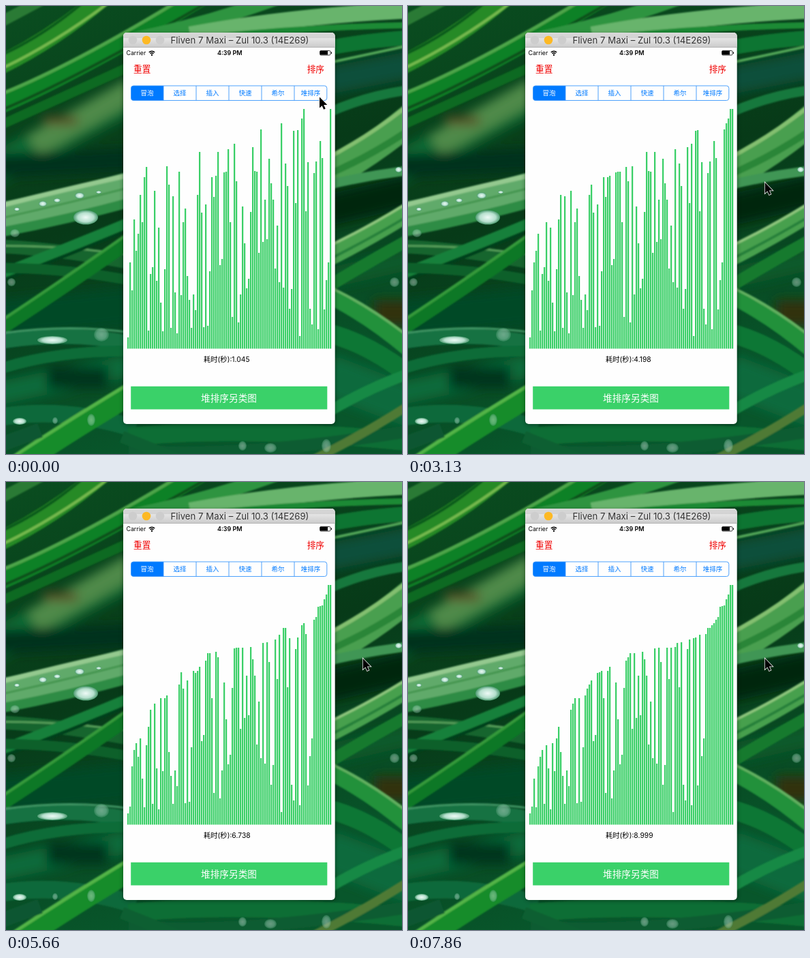
Recreate the animation shown at these times as an HTML page. Size 581 px wide and 657 px high, loop 8 s.

```html
<!DOCTYPE html>
<html lang="zh">
<head>
<meta charset="utf-8">
<title>冒泡</title>
<style>
  html, body { margin: 0; width: 100%; height: 100%; overflow: hidden; background: #07451e; }
  svg { display: block; width: 581px; height: 657px; }
  text { font-family: "Noto Sans CJK SC", "Noto Sans CJK", "Noto Sans", sans-serif; font-weight: 350; }
  .latin { font-family: Inter, "Open Sans", sans-serif; font-weight: 400; }
  .mixed { font-family: Inter, "Noto Sans CJK SC", "Noto Sans CJK", sans-serif; font-weight: 400; }
  .blades path { fill: none; }
  .mid { text-anchor: middle; }
  .tabs text { font-size: 9.5px; fill: #007aff; text-anchor: middle; }
</style>
</head>
<body>
<svg viewBox="0 0 581 657">
  <defs>
    <linearGradient id="base" x2=".3" y2="1">
      <stop offset="0" stop-color="#0a4d20"/>
      <stop offset=".5" stop-color="#073a18"/>
      <stop offset="1" stop-color="#08562b"/>
    </linearGradient>
    <linearGradient id="bar" x2="0" y2="1">
      <stop offset="0" stop-color="#d9d9d9"/>
      <stop offset=".36" stop-color="#d2d2d2"/>
      <stop offset=".4" stop-color="#e4e4e4"/>
      <stop offset="1" stop-color="#cbcbcb"/>
    </linearGradient>
    <radialGradient id="drop">
      <stop offset="0" stop-color="#eefaf6"/>
      <stop offset=".65" stop-color="#b5dfcd"/>
      <stop offset="1" stop-color="#4d9a70"/>
    </radialGradient>
    <filter id="soft"><feGaussianBlur stdDeviation="1"/></filter>
    <filter id="haze"><feGaussianBlur stdDeviation="8"/></filter>
    <filter id="shade" x="-10%" y="-10%" width="120%" height="120%"><feGaussianBlur stdDeviation="3"/></filter>
  </defs>

  <rect width="581" height="657" fill="url(#base)"/>
  <g class="blades" filter="url(#haze)">
    <path d="M-20 240L190 130" stroke="#0b6a35" stroke-width="46"/>
    <path d="M40 205L190 120" stroke="#4f8a48" stroke-width="34"/>
    <path d="M55 168H105" stroke="#5a4a20" stroke-width="12"/>
    <path d="M-20 235L190 225" stroke="#05301a" stroke-width="34"/>
    <path d="M-20 460L190 440" stroke="#064a28" stroke-width="56"/>
    <path d="M-20 570L190 525" stroke="#0a6a3a" stroke-width="34"/>
    <path d="M60 545H150" stroke="#04351c" stroke-width="32"/>
    <path d="M470 110L600 85" stroke="#08503a" stroke-width="40"/>
    <path d="M470 300L600 270" stroke="#06260f" stroke-width="46"/>
    <path d="M540 450H600" stroke="#33300f" stroke-width="38"/>
    <path d="M470 540L600 590" stroke="#0b6a3c" stroke-width="60"/>
    <path d="M470 400L600 370" stroke="#0b5a2a" stroke-width="30"/>
  </g>
  <g class="blades" filter="url(#soft)">
    <path d="M-20 92Q70 50 150 -20" stroke="#268a26" stroke-width="28"/>
    <path d="M-20 98Q70 58 168 -18" stroke="#75b94e" stroke-width="4"/>
    <path d="M-20 78Q60 44 130 -20" stroke="#0d5a1c" stroke-width="4"/>
    <path d="M-20 30L70 -18" stroke="#2c7a35" stroke-width="16"/>
    <path d="M-20 150Q90 105 300 -20" stroke="#118126" stroke-width="26"/>
    <path d="M-20 134Q90 92 260 -12" stroke="#4da548" stroke-width="5"/>
    <path d="M-20 158Q90 114 300 -8" stroke="#07501c" stroke-width="4"/>
    <path d="M-20 180Q90 130 190 85" stroke="#0c6a24" stroke-width="14"/>
    <path d="M180 50Q290 28 400 -12" stroke="#2f9440" stroke-width="20"/>
    <path d="M270 42Q420 14 600 6" stroke="#68b46c" stroke-width="24"/>
    <path d="M300 46Q450 30 600 28" stroke="#1c8a36" stroke-width="9"/>
    <path d="M470 62Q530 50 600 46" stroke="#0d7430" stroke-width="22"/>
    <path d="M470 84L600 56" stroke="#51a457" stroke-width="4"/>

    <path d="M-20 312Q80 292 190 262" stroke="#60aa6a" stroke-width="42"/>
    <path d="M-20 296Q80 270 190 246" stroke="#94c98f" stroke-width="7"/>
    <path d="M-20 314Q80 292 190 264" stroke="#45954f" stroke-width="3"/>
    <path d="M-20 334Q80 316 190 286" stroke="#2d8c45" stroke-width="14"/>
    <path d="M-20 352Q80 356 190 378" stroke="#13652f" stroke-width="20"/>
    <path d="M-20 352Q80 350 190 366" stroke="#559c59" stroke-width="3"/>
    <path d="M-20 398Q80 360 190 314" stroke="#17803a" stroke-width="16"/>
    <path d="M-20 408Q80 370 190 324" stroke="#05401a" stroke-width="5"/>
    <path d="M-20 384Q90 384 190 404" stroke="#0b602a" stroke-width="15"/>
    <path d="M-20 480Q80 415 190 338" stroke="#0f7827" stroke-width="22"/>
    <path d="M-20 470Q80 404 190 326" stroke="#369a3b" stroke-width="4"/>
    <path d="M-20 494Q90 474 190 496" stroke="#127243" stroke-width="22"/>
    <path d="M-20 482Q90 464 190 480" stroke="#3f9463" stroke-width="3"/>
    <path d="M-20 536Q70 504 190 506" stroke="#0b6c38" stroke-width="16"/>
    <path d="M-20 605Q80 585 190 620" stroke="#10693a" stroke-width="26"/>
    <path d="M10 680Q90 625 200 560" stroke="#168c2a" stroke-width="30"/>
    <path d="M0 668Q90 608 200 542" stroke="#53b446" stroke-width="5"/>
    <path d="M-20 648L50 622" stroke="#0b5630" stroke-width="22"/>

    <path d="M470 158Q530 130 600 122" stroke="#18783d" stroke-width="14"/>
    <path d="M465 252Q530 218 600 160" stroke="#4a9f4f" stroke-width="44"/>
    <path d="M465 226Q530 194 600 138" stroke="#83bf6f" stroke-width="6"/>
    <path d="M465 250Q530 224 600 176" stroke="#2a8639" stroke-width="10"/>
    <path d="M465 264Q530 248 600 240" stroke="#3f9655" stroke-width="14"/>
    <path d="M465 372Q530 340 600 296" stroke="#47a04e" stroke-width="28"/>
    <path d="M465 356Q530 326 600 282" stroke="#8cc47b" stroke-width="4"/>
    <path d="M465 376Q530 344 600 302" stroke="#25803a" stroke-width="4"/>
    <path d="M465 416Q530 376 600 338" stroke="#137a2e" stroke-width="18"/>
    <path d="M465 420Q530 450 600 510" stroke="#20913a" stroke-width="25"/>
    <path d="M465 408Q530 436 600 492" stroke="#62b060" stroke-width="4"/>
    <path d="M465 478Q530 492 600 548" stroke="#0c7735" stroke-width="28"/>
    <path d="M465 600Q530 560 600 536" stroke="#168944" stroke-width="16"/>
    <path d="M180 632Q350 614 600 640" stroke="#0e6e34" stroke-width="27"/>
    <path d="M180 652Q350 664 600 622" stroke="#0b5b32" stroke-width="18"/>
    <path d="M430 675Q510 638 600 580" stroke="#4f7a35" stroke-width="13"/>
    <path d="M170 632L260 668" stroke="#0a5e30" stroke-width="18"/>
  </g>
  <g fill="url(#drop)">
    <ellipse cx="117" cy="310" rx="18" ry="10.500"/>
    <ellipse cx="108" cy="278" rx="7" ry="4.500"/>
    <ellipse cx="54" cy="290" rx="6" ry="4"/>
    <ellipse cx="75" cy="285" rx="5" ry="3"/>
    <ellipse cx="16" cy="298" rx="4" ry="2.500"/>
    <ellipse cx="136" cy="273" rx="4" ry="2"/>
    <ellipse cx="68" cy="490" rx="22" ry="6"/>
    <ellipse cx="20" cy="609" rx="10" ry="5"/>
    <ellipse cx="576" cy="240" rx="5" ry="4"/>
    <g opacity=".4">
      <ellipse cx="13" cy="333" rx="7" ry="6"/>
      <ellipse cx="140" cy="482" rx="11" ry="10"/>
      <ellipse cx="8" cy="405" rx="6" ry="6"/>
      <ellipse cx="125" cy="607" rx="6" ry="9"/>
      <ellipse cx="72" cy="608" rx="4" ry="5"/>
      <ellipse cx="570" cy="405" rx="7" ry="7"/>
      <ellipse cx="347" cy="645" rx="6" ry="7"/>
      <ellipse cx="388" cy="648" rx="9" ry="7"/>
      <ellipse cx="470" cy="645" rx="7" ry="10"/>
    </g>
  </g>

  <rect x="172" y="41" width="311" height="573" rx="6" opacity=".4" filter="url(#shade)"/>
  <rect x="172" y="39" width="310.700" height="574" rx="5" fill="#fefefe"/>
  <path d="M172 60.500V44a5 5 0 0 1 5-5H477.700a5 5 0 0 1 5 5V60.500Z" fill="url(#bar)"/>
  <path d="M172 60.500H482.700" stroke="#b4b4b4"/>
  <circle cx="186" cy="50" r="6.300" fill="#cdcdcd"/>
  <circle cx="206" cy="50" r="6.300" fill="#fdb924"/>
  <circle cx="226" cy="50" r="6.300" fill="#cdcdcd"/>
  <text class="latin mid" x="343" y="55" font-size="13.200" fill="#333">Fliven 7 Maxi – Zul 10.3 (14E269)</text>

  <text class="latin" x="176.500" y="72" font-size="8.800">Carrier</text>
  <g fill="none" stroke="#000" stroke-width="1.400">
    <path d="M209.800 68a6 6 0 0 1 8.400 0M211.500 70a3.600 3.600 0 0 1 5 0"/>
    <circle cx="214" cy="71.800" r=".5"/>
  </g>
  <text class="latin mid" x="328.300" y="72" font-size="9" style="font-weight:600">4:39 PM</text>
  <rect x="460.500" y="65.500" width="15.500" height="6.500" rx="1.500" fill="none" stroke="#000" stroke-width=".8"/>
  <path d="M461 66h11v5.500h-11zM477 67.500h1v2.500h-1z"/>

  <g font-size="12.700" fill="#f00000">
    <text x="187" y="97">重置</text>
    <text x="441.700" y="97">排序</text>
  </g>

  <g class="tabs">
    <path d="M231 117H187a3.500 3.500 0 0 0-3.500 3.500V135a3.500 3.500 0 0 0 3.500 3.500H231Z" fill="#007aff"/>
    <rect x="183.500" y="117" width="287.300" height="21.500" rx="3.500" fill="none" stroke="#3a97fb" stroke-width=".9"/>
    <path d="M231 117v21.500m48-21.500v21.500m48-21.500v21.500m48-21.500v21.500m48-21.500v21.500" stroke="#3a97fb" stroke-width=".9"/>
    <text x="207" y="131.300" style="fill:#fff">冒泡</text>
    <text x="255" y="131.300">选择</text>
    <text x="303" y="131.300">插入</text>
    <text x="351" y="131.300">快速</text>
    <text x="399" y="131.300">希尔</text>
    <text x="447" y="131.300">堆排序</text>
  </g>

  <path id="bars" fill="#3acf67"/>
  <text id="elapsed" class="mixed" x="290" y="521.500" font-size="10.300"></text>
  <rect x="183.200" y="557.800" width="288.100" height="33.700" fill="#3ad169"/>
  <text class="mid" x="327" y="579.700" font-size="13.650" fill="#fff">堆排序另类图</text>
  <path id="cursor" d="M0 0V16L3.600 12.700 6.200 18.200 8.700 17 6.200 11.600H11.300Z" stroke="#fff" stroke-width="1.500" paint-order="stroke"/>
</svg>
<script>
const LOOP = 8000, BOTTOM = 502.5;
const tops = [
  486, 376, 417, 313, 359, 334, 277, 317, 251, 236, 476, 393, 383, 271, 403, 325, 435, 477, 386, 235,
  262, 472, 279, 420, 480, 243, 424, 317, 297, 396, 431, 472, 423, 446, 277, 214, 303, 471, 291, 469,
  389, 251, 280, 249, 214, 380, 371, 244, 243, 210, 317, 456, 202, 257, 464, 423, 294, 348, 414, 400,
  302, 207, 242, 243, 362, 181, 346, 284, 342, 224, 260, 284, 385, 322, 405, 172, 413, 231, 264, 444,
  415, 183, 289, 182, 484, 165, 151, 301, 229, 444, 467, 245, 228, 474, 198, 223, 445, 402, 376, 151
];

// Time in ms, swaps made, and the displayed timer in ms.
const pace = [
  [0, 0, 1045], [2080, 232, 3136], [3130, 347, 4198], [4770, 532, 5840],
  [5660, 638, 6738], [6830, 777, 7943], [7860, 901, 8999]
];

// The screen refreshes every 150 ms, with a few ticks of 140 ms.
const shortTicks = new Set([5, 12, 22, 36, 41, 43, 45, 47, 50, 53]);
const ticks = [];
for (let t = 0, i = 0; t < LOOP; i++) {
  ticks.push(t);
  t += shortTicks.has(i) ? 140 : 150;
}

const byId = id => document.getElementById(id);
const mix = (a, b, k) => a + (b - a) * k;

function paceAt(t, column) {
  let i = 1;
  while (i < pace.length - 1 && t > pace[i][0]) i++;
  const a = pace[i - 1], b = pace[i];
  return Math.round(mix(a[column], b[column], (t - a[0]) / (b[0] - a[0])));
}

function bubble(swaps) {
  const a = tops.slice();
  for (let end = a.length - 1; end > 0; end--) {
    for (let j = 0; j < end; j++) {
      if (a[j] >= a[j + 1]) continue;
      if (swaps-- <= 0) return a;
      [a[j], a[j + 1]] = [a[j + 1], a[j]];
    }
  }
  return a;
}

let shown = -1;
function draw(now) {
  const time = now % LOOP;
  const t = ticks.findLast(start => start <= time);
  if (t !== shown) {
    shown = t;
    byId("bars").setAttribute("d", bubble(paceAt(t, 1))
      .map((top, i) => `M${178 + 3 * i} ${top}h2.25V${BOTTOM}h-2.25Z`).join(""));
    byId("elapsed").textContent = "耗时(秒):" + (paceAt(t, 2) / 1000).toFixed(3);
    const k = Math.min(1, Math.max(0, (t - 50) / 850));
    const ease = k * k * (3 - 2 * k);
    byId("cursor").setAttribute("transform",
      `translate(${mix(460, 523.7, ease)} ${mix(133.5, 258.8, ease)})`);
  }
  requestAnimationFrame(draw);
}
draw(0);
</script>
</body>
</html>
```
